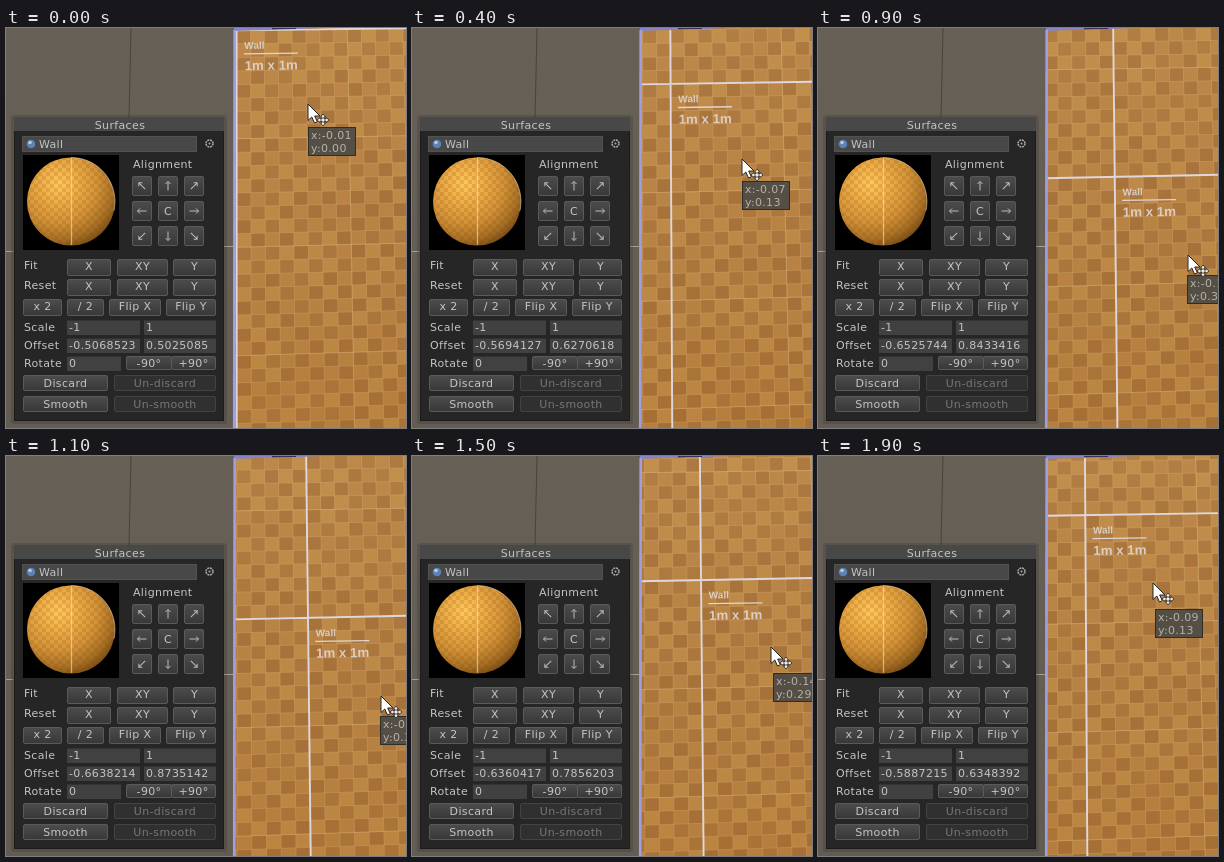
Write an HTML page that moves like this. It is 400 px wide and 400 px high and loops after 2000 ms.

```html
<!DOCTYPE html>
<html lang="en">
<head>
<meta charset="utf-8">
<title>Surface alignment</title>
<style>
  html, body { margin: 0; width: 100%; height: 100%; overflow: hidden; background: #655f54; }
  svg { display: block; width: 400px; height: 400px; }
  text { font: 11px "DejaVu Sans", sans-serif; letter-spacing: .35px; fill: #c4c4c4; white-space: pre; }
  .mid { text-anchor: middle; }
  .dim { fill: #777; }
  .mark text { font-family: "Liberation Sans", Arial, sans-serif; font-weight: bold; letter-spacing: 0; fill: #e0d6cf; opacity: .9; }
  .mark .name { font-size: 10px; }
  .mark .size { font-size: 13.3px; }
  .tip text { fill: #b5b1aa; letter-spacing: .3px; }
  .arrow { fill: none; stroke: #bbb; }
</style>
</head>
<body>
<svg viewBox="0 0 400 400">
  <defs>
    <linearGradient id="room" x2="0" y2="1">
      <stop stop-color="#666056"/><stop offset="1" stop-color="#625c52"/>
    </linearGradient>
    <linearGradient id="button" x2="0" y2="1">
      <stop stop-color="#4c4c4c"/><stop offset="1" stop-color="#383838"/>
    </linearGradient>
    <linearGradient id="wallLight" x2="0" y2="1">
      <stop stop-color="#d8a868" stop-opacity=".16"/><stop offset=".5" stop-color="#b88040" stop-opacity=".08"/>
      <stop offset="1" stop-color="#a86010" stop-opacity=".14"/>
    </linearGradient>
    <radialGradient id="ball" cx=".36" cy=".3" r=".74">
      <stop stop-color="#ffc75c"/><stop offset=".25" stop-color="#f0b04a"/>
      <stop offset=".6" stop-color="#d29238"/><stop offset=".85" stop-color="#a87026"/>
      <stop offset="1" stop-color="#7c5018"/>
    </radialGradient>
    <pattern id="checks" width="8" height="8" patternUnits="userSpaceOnUse">
      <path d="M0 0h4v8h4v-4h-8z" fill="#7a4200" opacity=".16"/>
    </pattern>
    <clipPath id="wallClip"><path d="M229.500 3L325 0H400V400H228.500z"/></clipPath>
  </defs>

  <rect width="400" height="400" fill="url(#room)"/>
  <path d="M125 0L123 90" stroke="#45443c"/>
  <path d="M0 223.500H7M218 218.500H228" stroke="#a59e91"/>

  <path d="M228 0H400V400H227z" fill="#8584c8"/>
  <path d="M266 .5L290 0" stroke="#34335c" stroke-width="2"/>
  <g clip-path="url(#wallClip)">
    <rect x="227" width="173" height="400" fill="#b07c40"/>
    <g id="tiles"></g>
    <path id="grout" fill="none" stroke="#cfa268" stroke-opacity=".5" stroke-width=".9"/>
    <path id="quarters" fill="none" stroke="#dbb884" stroke-opacity=".55"/>
    <rect x="227" width="173" height="400" fill="url(#wallLight)"/>
    <path id="axes" fill="none" stroke="#ded8dc" stroke-width="1.9"/>
    <g id="mark" class="mark">
      <text class="name" x="7.5" y="18.700">Wall</text>
      <path d="M7 23.700H61" stroke="#e0d6d0" stroke-width="1.300"/>
      <text class="size" x="7.5" y="40">1m x 1m</text>
    </g>
  </g>
  <path d="M228.700 2L228.200 400" stroke="#a09fe2" stroke-width="2.600"/>

  <g id="panel"></g>

  <g id="tip" class="tip">
    <rect x=".5" y=".5" width="47" height="28" fill="#504c46" fill-opacity=".95" stroke="#302d29"/>
    <text id="tipX" x="3" y="12"></text>
    <text id="tipY" x="3" y="25"></text>
  </g>
  <g id="cursor" stroke-linejoin="round">
    <path d="M0 0V16.500L3.800 13L6.500 19L9.300 17.700L6.700 12H12z" fill="#fff" stroke="#222"/>
    <path d="M15 10l2.500 3h-1.500v2h2v-1.500l3 2.500l-3 2.500v-1.500h-2v2h1.500l-2.500 3l-2.500-3h1.500v-2h-2v1.500l-3-2.500l3-2.500v1.500h2v-2h-1.500z" fill="#eee" stroke="#222" stroke-width=".8"/>
  </g>
</svg>
<script>
const $ = id => document.getElementById(id);
const LOOP = 2000;

// start ms, offset u, offset v, cursor x, cursor y, tooltip x, tooltip y
const poses = [
  [0, -0.5068523, 0.5025085, 302, 76, 302, 99],
  [200, -0.5356894, 0.559521, 314, 100, 314, 123],
  [400, -0.5694127, 0.6270618, 330, 131, 330, 153],
  [600, -0.6030864, 0.6946026, 347, 162, 346, 182],
  [700, -0.6281205, 0.7703418, 359, 196, 358, 216],
  [900, -0.6525744, 0.8433416, 370, 227, 369, 247],
  [1100, -0.6638214, 0.8735142, 375, 240, 374, 260],
  [1300, -0.6588082, 0.8566744, 370, 225, 372, 252],
  [1500, -0.6360417, 0.7856203, 359, 191, 361, 217],
  [1700, -0.6096045, 0.7038225, 346, 155, 348, 181],
  [1900, -0.5887215, 0.6348392, 335, 127, 337, 153]
];

function buildPanel() {
  const parts = [];
  const rect = (x, y, w, h, fill, stroke = 'none', rx = 0) => parts.push(
    `<rect x="${x}" y="${y}" width="${w}" height="${h}" fill="${fill}" stroke="${stroke}" rx="${rx}"/>`);
  const text = (x, y, label, cls = '', id = '') => parts.push(
    `<text x="${x}" y="${y}" class="${cls}" id="${id}">${label}</text>`);
  const button = (x, y, w, h, label, dim) => {
    rect(x + .5, y + .5, w - 1, h - 1, dim ? '#303030' : 'url(#button)', dim ? '#434343' : '#5a5a5a', 1.5);
    text(x + w / 2, y + Math.floor(h / 2) + (h === 17 ? 3 : 4), label, dim ? 'mid dim' : 'mid');
  };
  const field = (x, y, w, label, id) => {
    rect(x, y, w, 15, '#414141');
    parts.push(`<path d="M${x} ${y + .5}h${w}" stroke="#323232"/>`);
    text(x + 2, y + 11, label, '', id);
  };

  rect(5, 87, 216, 309, 'rgba(0,0,0,.12)', 'none', 3);
  rect(8.5, 89.5, 209, 303, '#262626', '#1c1c1c');
  rect(8, 89, 210, 14, '#484848');
  text(114, 101, 'Surfaces', 'mid');

  rect(16.5, 108.5, 174, 15, '#484848', '#525252');
  parts.push('<circle cx="25" cy="116" r="4.3" fill="#5b82b5"/><circle cx="24" cy="114.5" r="1.8" fill="#b5cbe4"/>');
  text(33, 120, 'Wall');
  parts.push('<circle cx="203.500" cy="115.500" r="3.500" fill="none" stroke="#aaa" stroke-width="1.500" stroke-dasharray="2 .75"/><circle cx="203.500" cy="115.500" r="1" fill="#aaa"/>');

  rect(17, 127, 96, 95, '#000');
  for (const fill of ['ball', 'checks'])
    parts.push(`<circle cx="65" cy="173.500" r="44" fill="url(#${fill})"/>`);
  parts.push('<path d="M65.500 130V217" stroke="#ffe0b0" stroke-opacity=".6" stroke-width="1.300"/>',
    '<path d="M65 129.500a44 44 0 0 1 43 53" fill="none" stroke="#e8d5bb" stroke-opacity=".6"/>');

  text(127, 140, 'Alignment');
  for (let row = -1; row <= 1; row++) for (let col = -1; col <= 1; col++) {
    const x = 162 + col * 26, y = 183 + row * 25;
    const centre = !row && !col;
    button(x - 10, y - 10, 20, 20, centre ? 'C' : '');
    const angle = Math.atan2(row, col) * 180 / Math.PI;
    if (!centre) parts.push(`<path class="arrow" transform="translate(${x} ${y}) rotate(${angle})" d="M-4.500 0H4.500M2 -2.500L4.500 0L2 2.500"/>`);
  }

  [['Fit', 231], ['Reset', 251]].forEach(([label, y]) => {
    text(18, y + 10, label);
    button(61, y, 44, 17, 'X');
    button(111, y, 51, 17, 'XY');
    button(167, y, 43, 17, 'Y');
  });
  button(17, 271, 39, 17, 'x 2');
  button(61, 271, 37, 17, '/ 2');
  button(103, 271, 52, 17, 'Flip X');
  button(160, 271, 50, 17, 'Flip Y');

  text(18, 303, 'Scale');
  field(61, 292, 73, '-1');
  field(138, 292, 72, '1');
  text(18, 321, 'Offset');
  field(61, 310, 73, '', 'offsetU');
  field(138, 310, 72, '', 'offsetV');
  text(18, 339, 'Rotate');
  field(61, 328, 54, '0');
  button(120, 328, 46, 14, '-90°');
  button(165, 328, 45, 14, '+90°');

  button(17, 347, 85, 16, 'Discard');
  button(108, 347, 102, 16, 'Un-discard', true);
  button(17, 368, 85, 16, 'Smooth');
  button(108, 368, 102, 16, 'Un-smooth', true);
  $('panel').innerHTML = parts.join('');
}

// Wall plane seen slightly from the side: a, b are distances from its top left corner.
function project(a, b) {
  const y = b - a * (.012 + .00006 * b);
  return [229 + a * (1 + .00016 * y), y];
}
const at = (a, b) => project(a, b).map(n => n.toFixed(1)).join(' ');
const across = b => `M${at(-2, b)}L${at(185, b)}`;
const down = a => `M${at(a, -5)}L${at(a, 410)}`;

const shades = ['#a5713a', '#aa763d', '#b88344', '#be8a48'];
const tilePaths = shades.map(fill => {
  const path = document.createElementNS('http://www.w3.org/2000/svg', 'path');
  path.setAttribute('fill', fill);
  return $('tiles').appendChild(path);
});
const noise = (i, j) => {
  const n = Math.sin(i * 12.9898 + j * 78.233) * 43758.5453;
  return n - Math.floor(n);
};

function drawWall(u, v) {
  const a0 = 1.6 + (-.5068 - u) * 443;
  const b0 = 2.3 + (v - .5025) * 434;
  const w = 443 / 32, h = 434 / 32;
  const left = Math.floor(-a0 / w) - 1, top = Math.floor(-b0 / h) - 1;
  const tiles = shades.map(() => '');
  let grout = '', quarters = '';

  for (let i = left; i < left + 16; i++) {
    const a = a0 + i * w;
    if (i % 8) grout += down(a); else if (i) quarters += down(a);
    for (let j = top; j < top + 33; j++) {
      const b = b0 + j * h;
      const light = (i + j) & 1;
      const shade = light * 2 + (noise(i & 31, j & 31) > .5 ? 1 : 0);
      tiles[shade] += `M${at(a, b)}L${at(a + w, b)}L${at(a + w, b + h)}L${at(a, b + h)}z`;
    }
  }
  for (let j = top; j < top + 33; j++) {
    const b = b0 + j * h;
    if (j % 8) grout += across(b); else if (j) quarters += across(b);
  }
  tilePaths.forEach((path, k) => path.setAttribute('d', tiles[k]));
  $('grout').setAttribute('d', grout);
  $('quarters').setAttribute('d', quarters);
  $('axes').setAttribute('d', across(b0) + down(a0));
  $('mark').setAttribute('transform', `translate(${at(a0, b0)}) rotate(-.8)`);
}

let shown;
function render(time) {
  const pose = poses.findLast(p => p[0] <= time % LOOP);
  if (pose === shown) return;
  shown = pose;
  const [, u, v, cx, cy, tx, ty] = pose;
  drawWall(u, v);
  $('offsetU').textContent = u;
  $('offsetV').textContent = v;
  $('tipX').textContent = 'x:' + (u + .5).toFixed(2);
  $('tipY').textContent = 'y:' + (v - .5).toFixed(2);
  $('cursor').setAttribute('transform', `translate(${cx} ${cy})`);
  $('tip').setAttribute('transform', `translate(${tx} ${ty})`);
}

buildPanel();
const start = performance.now();
function tick() {
  render(performance.now() - start);
  requestAnimationFrame(tick);
}
tick();
</script>
</body>
</html>
```
